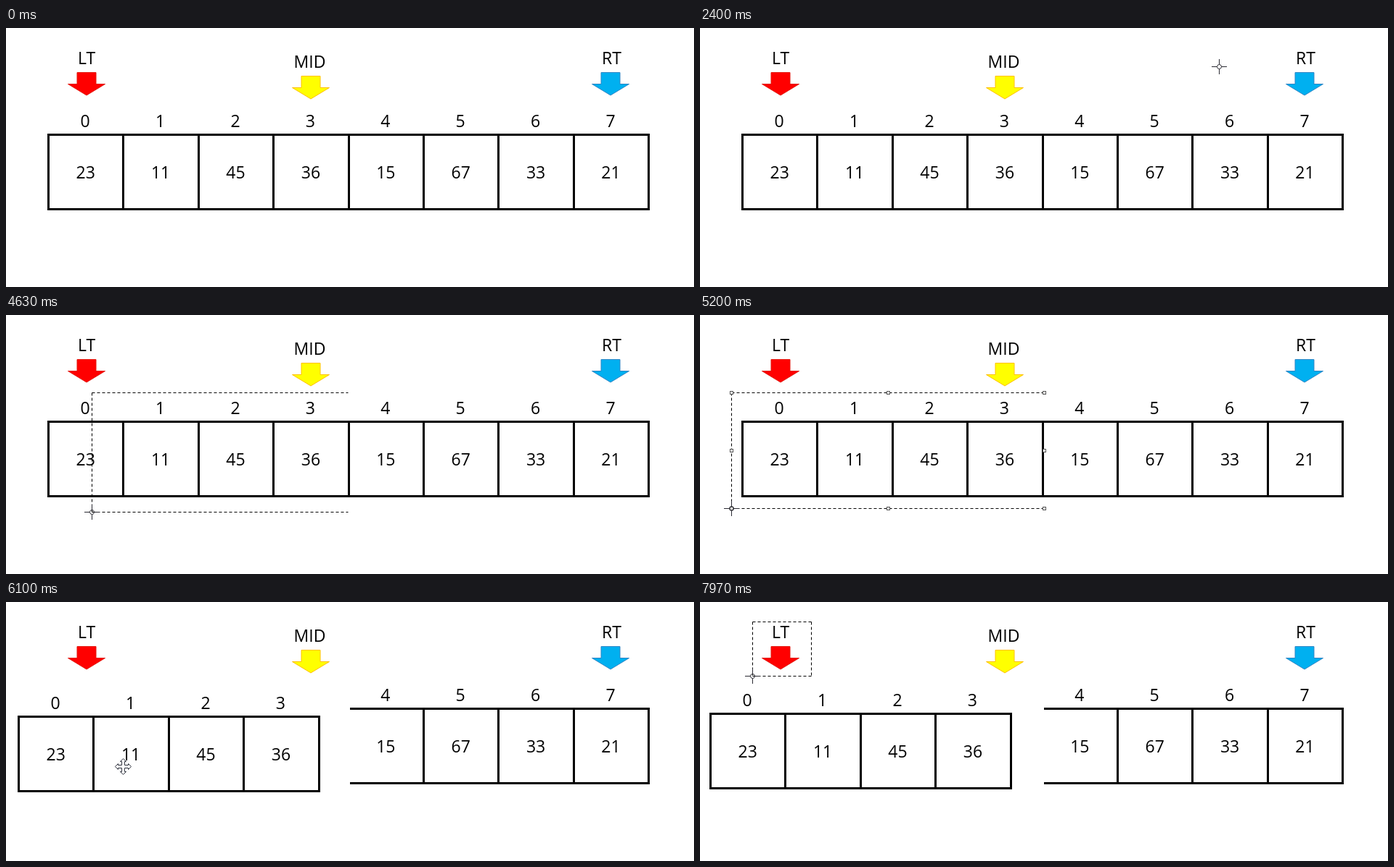
An HTML page with a canvas that plays this animation: 948 by 358 pixels, repeating every 8 s.

```html
<!DOCTYPE html>
<html lang="en">
<head>
<meta charset="utf-8">
<title>Splitting an array</title>
<style>
html, body { margin: 0; width: 100%; height: 100%; overflow: hidden; background: #fff; }
canvas { display: block; }
</style>
</head>
<body>
<canvas id="stage" width="948" height="358"></canvas>
<script>
const ctx = document.getElementById('stage').getContext('2d');
const LOOP = 8000;
const values = [23, 11, 45, 36, 15, 67, 33, 21];
const CELL = 103.4, LEFT = 57, TOP = 146, SIDE = 106, SPLIT = 474;
const GRAB = { x: 202, y: 216 }, DROP = { x: 158, y: 223 };

// Times in ticks of 1/30 s
const ENTER = 26, SELECT = 124, SELECTED = 156, HOVER = 158, MOVE = 175;
const DROPPED = 203, LEAVE = 212, CLEAR = 224, RESELECT = 228;

// Turning points of the pointer: tick, x, y
const path = [
  // sweep over the labels and the cells
  [ENTER, 25, 352], [40, 130, 23], [47, 395, 122], [56, 108, 60], [64, 260, 8],
  [73, 745, 60], [83, 874, 150], [87, 780, 271], [97, 449, 131], [102, 470, 107],
  // select the left half
  [SELECT, 473, 107], [139, 118, 272], [143, 61, 299], [153, 43, 267], [157, 43, 267],
  // move it away
  [171, GRAB.x, GRAB.y], [183, 161, 227], [187, 161, 227], [191, 158, 231],
  [201, DROP.x, DROP.y], [DROPPED, DROP.x, DROP.y],
  // select the first label
  [221, 153, 27], [RESELECT - 1, 153, 27], [239, 72, 102]
];

// Monotone cubic through the turning points: smooth, no overshoot
function along(t, axis) {
  const last = path.length - 1;
  const slope = k => k < 0 || k >= last ? 0
    : (path[k + 1][axis] - path[k][axis]) / (path[k + 1][0] - path[k][0]);
  const tangent = k => {
    const a = slope(k - 1), b = slope(k);
    return a * b <= 0 ? 0 : 2 * a * b / (a + b);
  };
  let i = 0;
  while (i < last - 1 && path[i + 1][0] <= t) i++;
  const h = path[i + 1][0] - path[i][0];
  const u = Math.min(1, Math.max(0, (t - path[i][0]) / h));
  const ease = u * u * (3 - 2 * u);
  return Math.round(path[i][axis] + slope(i) * h * ease
    + h * u * (1 - u) * (tangent(i) * (1 - u) - tangent(i + 1) * u));
}

function outline(fill, edge) {
  ctx.closePath();
  ctx.fillStyle = fill;
  ctx.fill();
  ctx.strokeStyle = edge;
  ctx.stroke();
}

function text(str, x, y) {
  ctx.fillStyle = '#000';
  ctx.fillText(str, x, y);
}

function arrow(label, labelX, x, y, fill, edge) {
  text(label, labelX, y - 12);
  ctx.beginPath();
  ctx.moveTo(x, y + 31.5);
  ctx.lineTo(x - 25.5, y + 16);
  ctx.lineTo(x - 13, y + 16);
  ctx.lineTo(x - 13, y);
  ctx.lineTo(x + 13, y);
  ctx.lineTo(x + 13, y + 16);
  ctx.lineTo(x + 25.5, y + 16);
  outline(fill, edge);
}

function bar(x, y, w, h) {
  ctx.fillStyle = '#000';
  ctx.fillRect(x, y, w, h);
}

// Cells from..to-1, lines clipped to xa..xb
function cells(from, to, xa, xb) {
  bar(xa, TOP, xb - xa, 3);
  bar(xa, TOP + SIDE - 3, xb - xa, 3);
  for (let i = from; i <= to; i++) {
    const x = Math.floor(LEFT + 0.5 + i * CELL);
    if (x >= xa && x < xb) bar(x, TOP, 3, SIDE);
    if (i === to) break;
    const mid = LEFT + 52.7 + i * CELL;
    text(i, mid - 0.5, 137);
    text(values[i], mid, 208);
  }
}

// Dashed box; the right side is optional
function box(l, t, r, b, closed) {
  const line = (x1, y1, x2, y2) => {
    ctx.beginPath();
    ctx.moveTo(x1 + 0.5, y1 + 0.5);
    ctx.lineTo(x2 + 0.5, y2 + 0.5);
    ctx.stroke();
  };
  ctx.strokeStyle = '#000';
  ctx.setLineDash([4, 3]);
  line(l, t, r, t);
  line(l, b, r, b);
  line(l, t, l, b);
  if (closed) line(r, t, r, b);
  ctx.setLineDash([]);
}

function handles(l, t, r, b) {
  ctx.strokeStyle = '#555';
  ctx.fillStyle = '#fff';
  for (let i = 0; i < 9; i++) {
    if (i === 4) continue;
    const x = Math.round(l + (r - l) * (i % 3) / 2) - 1.5;
    const y = Math.round(t + (b - t) * Math.floor(i / 3) / 2) - 1.5;
    ctx.fillRect(x, y, 4, 4);
    ctx.strokeRect(x, y, 4, 4);
  }
}

function cross() {
  ctx.strokeStyle = '#2b2b33';
  ctx.beginPath();
  for (let i = 0; i < 4; i++) {
    ctx.moveTo(3, 0);
    ctx.lineTo(10.5, 0);
    ctx.rotate(Math.PI / 2);
  }
  ctx.moveTo(3, 0);
  ctx.arc(0, 0, 3, 0, 7);
  ctx.stroke();
}

function mover() {
  ctx.beginPath();
  for (let i = 0; i < 4; i++) {
    ctx.lineTo(-2, -2);
    ctx.lineTo(-2, -7);
    ctx.lineTo(-4, -7);
    ctx.lineTo(0, -11);
    ctx.lineTo(4, -7);
    ctx.lineTo(2, -7);
    ctx.rotate(Math.PI / 2);
  }
  outline('#fff', '#30343f');
}

function draw(ms) {
  const t = Math.floor(ms * 0.03 + 0.15);
  const x = along(t, 1), y = along(t, 2);
  const held = t < MOVE ? GRAB : t < DROPPED ? { x, y } : DROP;
  const dx = held.x - GRAB.x, dy = held.y - GRAB.y;

  ctx.fillStyle = '#fff';
  ctx.fillRect(0, 0, 948, 358);
  ctx.font = '23px "Open Sans", "Noto Sans", sans-serif';
  ctx.textAlign = 'center';
  ctx.lineWidth = 1;

  arrow('LT', 111, 111, 61.5, '#ff0000', '#e3170d');
  arrow('MID', 418.5, 420, 66.5, '#ffff00', '#ffc000');
  arrow('RT', 834.5, 833, 61.5, '#00b0f0', '#2f86c6');

  cells(4, 8, SPLIT, LEFT + 830);
  ctx.save();
  ctx.translate(dx, dy);
  cells(0, 4, LEFT, SPLIT);
  if ((t >= SELECTED && t < MOVE - 2) || (t >= DROPPED && t < CLEAR)) {
    box(43, 107, SPLIT, 267, false);
    handles(43, 107, SPLIT, 267);
  }
  ctx.restore();

  if (t >= SELECT && t < SELECTED) box(x, 107, 471, y, false);
  if (t >= RESELECT) box(x, 27, 153, y, true);

  if (t < ENTER) return;
  ctx.save();
  ctx.translate(x + 0.5, y + 0.5);
  if (t >= HOVER && t < LEAVE) mover();
  else cross();
  ctx.restore();
}

let start = null;
function tick(now) {
  if (start === null) start = now;
  draw((now - start) % LOOP);
  requestAnimationFrame(tick);
}
draw(0);
requestAnimationFrame(tick);
</script>
</body>
</html>
```
